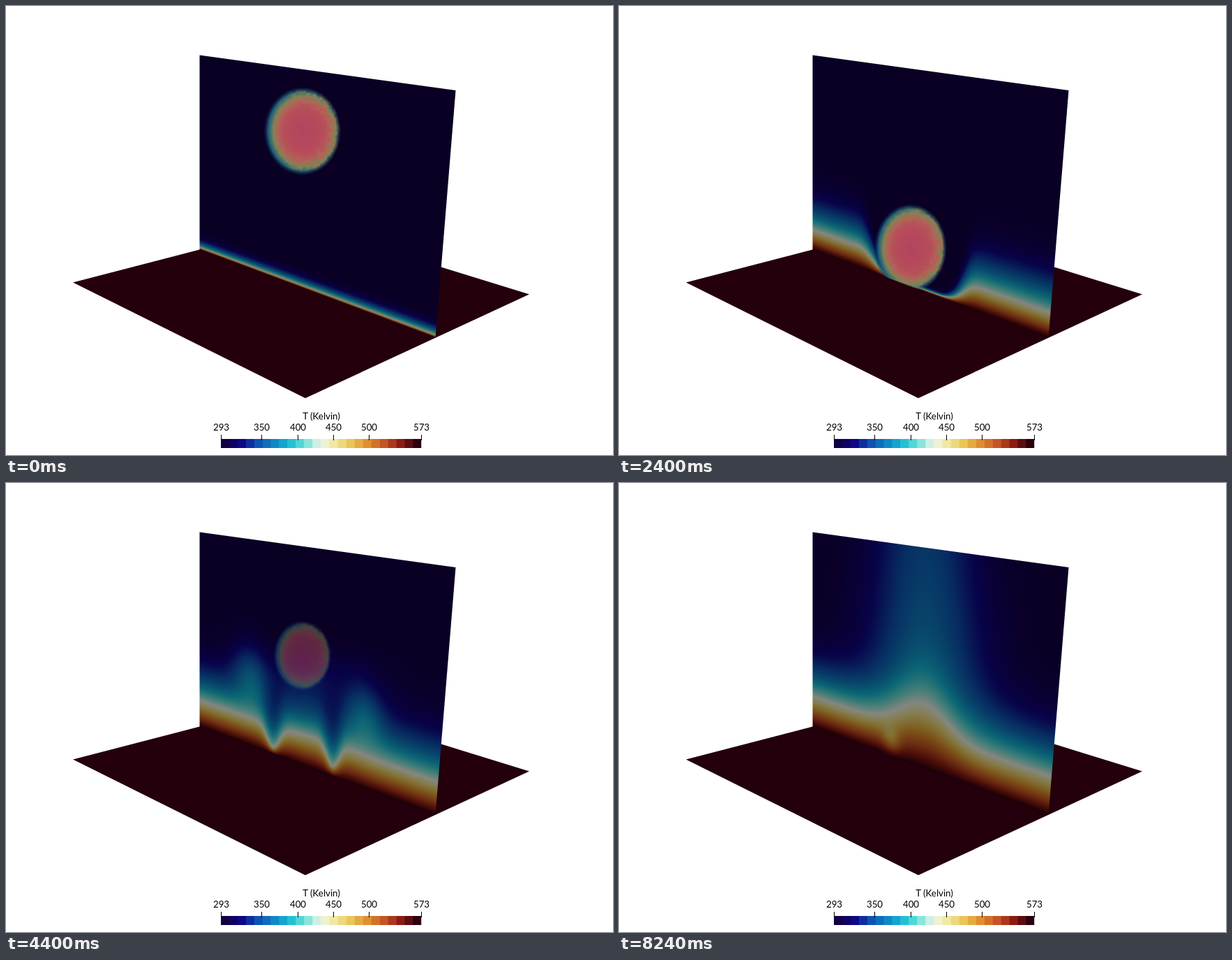
An HTML page with a canvas for the animation above (8.32 s loop, 870 by 644 pixels).

```html
<!DOCTYPE html>
<html lang="en">
<head>
<meta charset="utf-8">
<title>Droplet on a hot plate</title>
<style>
  html, body { margin: 0; width: 100%; height: 100%; overflow: hidden; background: #fff; }
  svg, canvas { position: absolute; left: 0; top: 0; }
  canvas { left: 277px; top: 70px; clip-path: polygon(.5px .5px, 367.5px 51px, 338.5px 406px, .5px 279.5px); }
  text { font: 13.3px Lato, sans-serif; text-anchor: middle; }
</style>
</head>
<body>
<svg id="scene" width="870" height="644" viewBox="0 0 870 644">
  <path d="M96 396.5L429 562.5L750 413.5L421 312Z" fill="#24000c"/>
  <text x="452" y="593">T (Kelvin)</text>
</svg>
<canvas id="wall" width="368" height="406"></canvas>
<script>
const LOOP = 8320, STEP = 80, LEFT = 277, TOP = 70;
const canvas = document.getElementById('wall');
const ctx = canvas.getContext('2d');
const image = ctx.createImageData(canvas.width, canvas.height);

const clamp = (v, lo = 0, hi = 1) => Math.min(hi, Math.max(lo, v));
const ease = (a, b, v) => { const s = clamp((v - a) / (b - a)); return s * s * (3 - 2 * s); };
const bell = (d, width) => Math.exp(-((d / width) ** 2));
const lerp = (a, b, s) => a + (b - a) * s;

// Lookup table through evenly spaced colours
function ramp(colors, size, shade = 1) {
  const stops = colors.split(' ').map(c => [1, 3, 5].map(i => parseInt(c.slice(i, i + 2), 16)));
  return Array.from({ length: size }, (_, k) => {
    const p = k / (size - 1) * (stops.length - 1), i = Math.min(Math.floor(p), stops.length - 2);
    return stops[i].map((v, c) => lerp(v, stops[i + 1][c], p - i) * shade);
  });
}
const HEAT = '#120042 #0e0484 #0d4eb0 #0e82c3 #14b9d4 #6ce2d7 #f0f5e8 ' +
  '#f0e491 #eabe4e #dd8828 #c45022 #8a190f #2c000e';
const RIM = '#b2425e #b4465e #b5485c #b64a5c #b6505a #b26256 #828256 #1e6276 #081e5a';
const wallColors = ramp(HEAT, 512, .55);
const rimColors = ramp(RIM, 256);

const grain = (x, y) => {
  const v = Math.sin(Math.floor(x / 5) * 12.99 + Math.floor(y / 5) * 78.23) * 43758.5;
  return v - Math.floor(v) - .5;
};

const IMPACT = 2400;

// Free fall, then a flattened rebound that fades
function dropletAt(t) {
  const s = t / 1000, u = Math.max(0, (t - IMPACT) / 1440);
  const squash = Math.sin(Math.PI * clamp(u / 1.3));
  const fade = ease(4100, 4700, t), size = 1 - .4 * fade;
  return {
    x: 424 - 7 * clamp(t / IMPACT) + 5 * u,
    y: u ? 348 + 90 * u - 117 * u * u : 179 + 7.1 * s + 26.2 * s * s,
    rx: (50 - 3 * clamp(t / IMPACT) + 7 * squash) * size,
    ry: (57 - 30 * squash) * size,
    shear: .15 * squash, power: 2 + squash, squash, opacity: 1 - fade
  };
}

// Hot layer: height of its pale contour and of its blue one in each column
function layerAt(t) {
  const pale = 3 + 42 * (1 - Math.exp(-t / 2600));
  const blue = 13 + 84 * (1 - Math.exp(-t / 2200));
  const hit = .93 * ease(1500, 2350, t);
  const press = hit * (1 - ease(2400, 3800, t));
  const chill = hit * (1 - ease(3500, 4900, t));
  const close = ease(3840, 5120, t);
  const ring = .75 * ease(2700, 3700, t) * (1 - ease(4900, 6300, t));
  const hump = 42 * ease(3400, 8300, t), humpX = 472 - 35 * ease(4800, 8000, t);
  return x => {
    const grow = 1 + .3 * (x - LEFT) / 338;
    const under = Math.exp(-(((x - 428) / 68) ** 6));
    const notch = bell(x - lerp(374, 394, close), 13) + bell(x - lerp(499, 422, close), 13);
    const low = pale * grow * (1 - press * under) * (1 - ring * Math.min(notch, 1)) +
      hump * bell(x - humpX, 48);
    return [Math.max(low, 1), Math.max((blue - pale) * grow * (1 - chill * under), 4)];
  };
}

function draw(t) {
  const drop = dropletAt(t), layer = layerAt(t);
  const plume = ease(3900, 5000, t), plumeX = 430 + 8 * ease(5000, 8000, t);
  const plumeTop = 300 - .175 * (t - 3900);
  const swirl = .3 * ease(2700, 3700, t) * (1 - ease(4000, 5000, t));
  const swirlUp = 35 + 60 * ease(2600, 3900, t);
  const foot = .14 * ease(5200, 6400, t);
  const { width: w, height: h, data } = image;

  for (let i = 0; i < w; i++) {
    const x = i + LEFT, base = 349 + .374 * (x - 278);
    const [pale, tail] = layer(x);
    const sides = swirl * (bell(x - 350, 26) + bell(x - 515, 26));
    const footX = foot * bell(x - 390, 13);

    for (let j = 0; j < h; j++) {
      const y = j + TOP, up = Math.max(base - y, 0), s = (up - pale) / tail;
      let T = s < 0 ? 1 - .5 * up / pale : .5 * Math.exp(-.9 * s - .5 * s * s);

      const down = clamp((y - 71) / 300);
      const warm = plume * (.19 + .1 * down) * bell(x - plumeX, 72 + 18 * down) *
        ease(plumeTop, plumeTop + 80, y) + sides * bell(up - swirlUp, 48);
      T += warm * Math.max(0, 1 - 2 * T) - footX * bell(up - 24, 18);

      const color = wallColors[Math.round(clamp(T) * 511)];
      let over = color, alpha = 0;
      const nx = (x - drop.x) / drop.rx, ny = (y - drop.y - drop.shear * (x - drop.x)) / drop.ry;
      if (drop.opacity > 0 && Math.abs(nx) < 1.2 && Math.abs(ny) < 1.2) {
        const d = (Math.abs(nx) ** drop.power + Math.abs(ny) ** drop.power) ** (1 / drop.power);
        const e = d * (1 + .1 * drop.squash) - .09 * nx + grain(x, y) * .07 * (1 + nx);
        alpha = clamp((1.11 - d) / .13) * drop.opacity;
        over = rimColors[Math.round(clamp(e / 1.2) * 255)];
      }
      const k = (j * w + i) * 4;
      for (let c = 0; c < 3; c++) data[k + c] = lerp(color[c], over[c], alpha);
      data[k + 3] = 255;
    }
  }
  ctx.putImageData(image, 0, 0);
}

function addLegend() {
  const x0 = 308, span = 287, colors = ramp(HEAT, 24), step = span / colors.length;
  let out = colors.map((c, i) =>
    `<rect x="${x0 + step * i}" y="621" width="${step + .2}" height="13" fill="rgb(${c.map(Math.round)})"/>`).join('');
  for (const k of [293, 350, 400, 450, 500, 573]) {
    const x = Math.round(x0 + span * (k - 293) / 280) + .5;
    out += `<path d="M${x} 615v8" stroke="#000"/><text x="${x}" y="609">${k}</text>`;
  }
  document.getElementById('scene').insertAdjacentHTML('beforeend', out);
}

let shown = -1;
const start = performance.now();
function tick(now) {
  const t = Math.floor(Math.max(now - start, 0) % LOOP / STEP) * STEP;
  if (t !== shown) draw(shown = t);
  requestAnimationFrame(tick);
}
addLegend();
tick(start);
</script>
</body>
</html>
```
